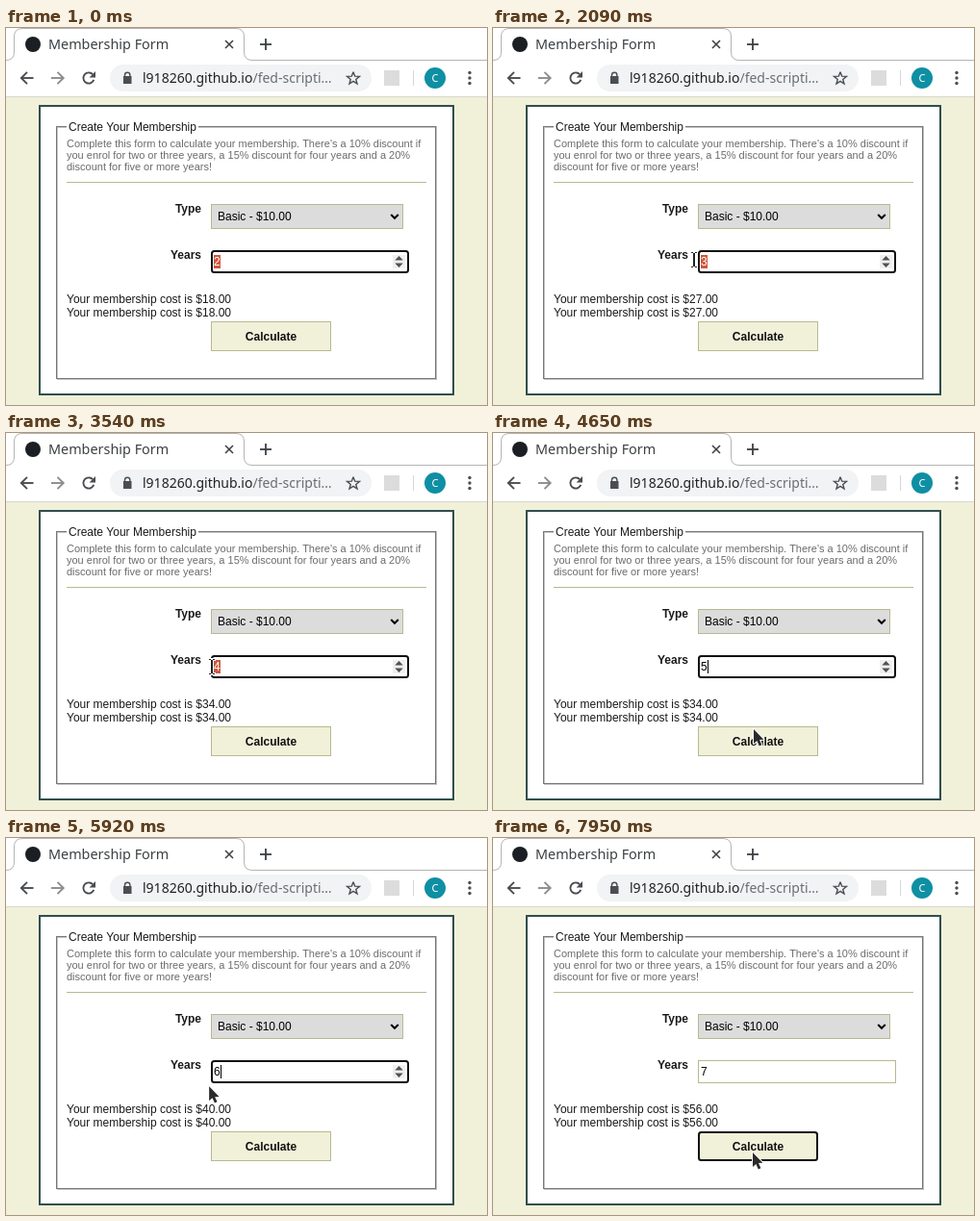
These frames come from a looping animation (500 by 392 pixels, 7990 ms). An HTML page with a canvas:

```html
<!DOCTYPE html>
<html lang="en">
<head>
<meta charset="utf-8">
<title>Membership Form</title>
<style>
  html, body { margin: 0; width: 100%; height: 100%; overflow: hidden; background: #fff; }
  canvas { display: block; width: 500px; height: 392px; }
</style>
</head>
<body>
<canvas id="stage"></canvas>
<script>
const W = 500, H = 392, LOOP = 7990;
const canvas = document.getElementById('stage');
const ratio = window.devicePixelRatio || 1;
canvas.width = W * ratio;
canvas.height = H * ratio;
const ctx = canvas.getContext('2d');

const SANS = '"Liberation Sans", Arial, sans-serif';
const UI = '"Noto Sans", "Open Sans", sans-serif';
const CREAM = '#f1f0d9', KHAKI = '#b9b890', INK = '#1a1a1a', SLATE = '#2f4f4f';

// Each round: press in the field, type a number, click the button.
const rounds = [
  { press: -1000, type: 590, click: 1250, years: 3, cost: 27 },
  { press: 1800, type: 2210, click: 2850, years: 4, cost: 34 },
  { press: 3300, type: 4200, click: 5070, years: 5, cost: 40 },
  { press: 5430, type: 5880, click: 6450, years: 6, cost: 48 },
  { press: 6950, type: 7510, click: 7900, years: 7, cost: 56 }
];

// Pointer path: time, x, y
const path = [
  [0, 217, 243], [600, 217, 243], [1150, 272, 324], [1400, 272, 324],
  [1720, 226, 243], [1800, 226, 243], [2090, 209, 241], [2200, 209, 241],
  [2750, 272, 320], [3020, 272, 320], [3270, 226, 244], [3320, 226, 244],
  [3540, 214, 243], [4200, 214, 243], [4650, 271, 308], [4950, 273, 314],
  [5080, 273, 314], [5390, 228, 244], [5450, 228, 244], [5780, 202, 243],
  [5850, 202, 243], [5920, 211, 258], [6330, 271, 316], [6640, 271, 316],
  [6790, 243, 255], [6900, 226, 244], [6960, 226, 244], [7230, 187, 243],
  [7450, 209, 243], [7500, 209, 243], [7850, 270, 327], [7990, 270, 327]
];

function slope(i, axis) {
  const a = path[i], b = path[i + 1];
  return a && b ? (b[axis] - a[axis]) / (b[0] - a[0]) : 0;
}

// Smooth tangent without overshoot
function tangent(i, axis) {
  const p = slope(i - 1, axis), q = slope(i, axis);
  return p * q > 0 ? 2 * p * q / (p + q) : 0;
}

function pointerAt(t) {
  let i = 0;
  while (i < path.length - 2 && path[i + 1][0] <= t) i++;
  const a = path[i], b = path[i + 1], span = b[0] - a[0], u = (t - a[0]) / span;
  const at = axis => {
    const v = 1 - u;
    return a[axis] * (1 + 2 * u) * v * v + b[axis] * u * u * (3 - 2 * u)
      + span * (tangent(i, axis) * u * v * v - tangent(i + 1, axis) * u * u * v);
  };
  return { x: at(1), y: at(2) };
}

function rect(x, y, w, h, color) {
  ctx.fillStyle = color;
  ctx.fillRect(x, y, w, h);
}

function frame(x, y, w, h, color, line = 1) {
  ctx.strokeStyle = color;
  ctx.lineWidth = line;
  ctx.strokeRect(x + line / 2, y + line / 2, w - line, h - line);
}

function ring(x, y, w, h) {
  ctx.beginPath();
  ctx.roundRect(x + 1, y + 1, w - 2, h - 2, 2.5);
  ctx.strokeStyle = '#101010';
  ctx.lineWidth = 2;
  ctx.stroke();
}

function text(str, x, y, font, color = INK, align = 'left') {
  ctx.font = font;
  ctx.textAlign = align;
  ctx.fillStyle = color;
  ctx.fillText(str, x, y);
}

function stroke(points, color, line) {
  ctx.beginPath();
  points.forEach(([x, y]) => ctx.lineTo(x, y));
  ctx.strokeStyle = color;
  ctx.lineWidth = line;
  ctx.stroke();
}

function shape(points, color) {
  ctx.beginPath();
  points.forEach(([x, y]) => ctx.lineTo(x, y));
  ctx.closePath();
  ctx.fillStyle = color;
  ctx.fill();
}

function disc(x, y, r, color) {
  ctx.beginPath();
  ctx.arc(x, y, r, 0, Math.PI * 2);
  ctx.fillStyle = color;
  ctx.fill();
}

function drawTabs() {
  rect(0, 0, W, 72, '#fff');
  ctx.beginPath();
  ctx.moveTo(0, 33.5);
  ctx.quadraticCurveTo(8.5, 33.5, 8.5, 25);
  ctx.lineTo(8.5, 9);
  ctx.quadraticCurveTo(8.5, 0.5, 17, 0.5);
  ctx.lineTo(239, 0.5);
  ctx.quadraticCurveTo(247.5, 0.5, 247.5, 9);
  ctx.lineTo(247.5, 25);
  ctx.quadraticCurveTo(247.5, 33.5, 256, 33.5);
  ctx.lineTo(W, 33.5);
  ctx.strokeStyle = '#b4b4b4';
  ctx.lineWidth = 1;
  ctx.stroke();

  disc(28, 17, 8, '#1b1f23');
  text('Membership Form', 44, 22, '14.4px ' + UI, '#3c4043');
  stroke([[228, 13], [236, 21]], '#3c4043', 1.6);
  stroke([[236, 13], [228, 21]], '#3c4043', 1.6);
  stroke([[264, 17], [276, 17]], '#3c4043', 1.8);
  stroke([[270, 11], [270, 23]], '#3c4043', 1.8);
}

function drawToolbar() {
  const dark = '#4a4d51';
  stroke([[28.5, 52], [16, 52]], dark, 1.9);
  stroke([[22, 45.8], [15.8, 52], [22, 58.2]], dark, 1.9);
  stroke([[47, 52], [59.5, 52]], '#8b8d90', 1.9);
  stroke([[53.5, 45.8], [59.7, 52], [53.5, 58.2]], '#8b8d90', 1.9);

  ctx.beginPath();
  ctx.arc(86, 52, 5.6, 0.35, Math.PI * 1.76);
  ctx.strokeStyle = dark;
  ctx.lineWidth = 1.9;
  ctx.stroke();
  shape([[93, 45], [93, 51.4], [86.6, 51.4]], dark);

  ctx.beginPath();
  ctx.roundRect(108, 38, 272, 28, 14);
  ctx.fillStyle = '#f1f3f4';
  ctx.fill();

  rect(122, 50, 8.5, 8, dark);
  ctx.beginPath();
  ctx.arc(126.2, 49, 2.7, Math.PI, 0);
  ctx.lineTo(128.9, 51);
  ctx.moveTo(123.5, 51);
  ctx.lineTo(123.5, 49);
  ctx.lineWidth = 1.4;
  ctx.stroke();

  const font = '14px ' + UI, host = 'l918260.github.io';
  text(host, 142, 57, font, '#202124');
  text('/fed-scripti…', 142 + ctx.measureText(host).width, 57, font, '#6a6e73');

  const star = [];
  for (let i = 0; i < 11; i++) {
    const a = -Math.PI / 2 + i * Math.PI / 5, r = i % 2 ? 2.9 : 6.8;
    star.push([361 + r * Math.cos(a), 52.5 + r * Math.sin(a)]);
  }
  stroke(star, dark, 1.4);

  rect(393, 44, 16, 16, '#dcdcdc');
  rect(423, 44, 1, 16, '#d5d7da');
  disc(446, 52, 11, '#0f8fa3');
  text('C', 446, 56, '11px ' + UI, '#fff', 'center');
  [46.5, 52, 57.5].forEach(y => disc(482, y, 1.7, dark));
  rect(0, 71, W, 1, '#d6d6d0');
}

function drawPage() {
  rect(0, 72, W, H - 72, CREAM);
  rect(34, 80, 432, 302, '#fff');
  frame(34, 80, 432, 302, SLATE, 2);

  frame(53, 103, 395, 263, '#c6c6c6');
  frame(52, 102, 395, 263, '#777');
  rect(447, 102, 1, 264, '#bbb');
  rect(446, 103, 1, 262, '#777');
  rect(63, 100, 137, 6, '#fff');
  text('Create Your Membership', 65, 107, '12px ' + SANS);

  [
    "Complete this form to calculate your membership. There's a 10% discount if",
    'you enrol for two or three years, a 15% discount for four years and a 20%',
    'discount for five or more years!'
  ].forEach((line, i) => text(line, 63, 124 + 12 * i, '11px ' + SANS, '#6b6b6b'));
  rect(63, 160, 374, 1, KHAKI);

  const bold = 'bold 12px ' + SANS;
  text('Type', 203, 192, bold, INK, 'right');
  text('Years', 203, 240, bold, INK, 'right');

  rect(213, 183, 200, 26, '#dcdcdc');
  frame(213, 183, 200, 26, KHAKI);
  text('Basic - $10.00', 220, 200, '12px ' + SANS, '#000');
  stroke([[400.2, 194], [404, 197.8], [407.8, 194]], '#000', 2);
}

function drawSpinner() {
  rect(402, 236, 13, 14, '#efefef');
  shape([[404.3, 241.5], [408.5, 237], [412.7, 241.5]], '#505050');
  shape([[404.3, 244.5], [408.5, 249], [412.7, 244.5]], '#505050');
}

function drawField(t, round, pointer) {
  const focused = t < round.click, typed = t >= round.type;
  const selected = !typed && pointer.x < 220;
  const hover = pointer.x > 213 && pointer.x < 419 && pointer.y > 231 && pointer.y < 255;

  rect(213, 231, 206, 24, '#fff');
  if (focused) ring(213, 231, 206, 24);
  else frame(213, 231, 206, 24, KHAKI);
  if (focused || hover) drawSpinner();

  if (selected) rect(216, 236, 7, 14, '#d1573e');
  text(typed ? round.years : round.years - 1, 216, 247, '12px ' + SANS, selected ? '#fff' : '#000');

  const since = t - (typed ? round.type : round.press);
  if (focused && !selected && since % 1000 < 500) rect(223, 236, 1, 14, '#000');
}

function drawResult(cost, focused) {
  const line = `Your membership cost is $${cost}.00`;
  text(line, 63, 286, '12px ' + SANS);
  text(line, 63, 300, '12px ' + SANS);

  rect(213, 305, 125, 31, CREAM);
  if (focused) ring(213, 305, 125, 31);
  else frame(213, 305, 125, 31, KHAKI);
  text('Calculate', 275.5, 325, 'bold 12px ' + SANS, '#111', 'center');
}

function drawArrow(x, y) {
  ctx.beginPath();
  [[0, 0], [0, 15], [3.4, 12], [5.8, 17.4], [8.4, 16.2], [6, 11], [10.4, 10.8]]
    .forEach(([dx, dy]) => ctx.lineTo(x + dx, y + dy));
  ctx.closePath();
  ctx.lineJoin = 'round';
  ctx.strokeStyle = '#fff';
  ctx.lineWidth = 2;
  ctx.stroke();
  ctx.lineJoin = 'miter';
  ctx.fillStyle = '#2b2b2b';
  ctx.fill();
}

function drawBeam(x, y) {
  const cx = Math.round(x), cy = Math.round(y);
  const bars = [[-3, -8, 2, 1], [1, -8, 2, 1], [-1, -7, 2, 14], [-3, 7, 2, 1], [1, 7, 2, 1]];
  bars.forEach(([dx, dy, w, h]) => rect(cx + dx - 1, cy + dy - 1, w + 2, h + 2, '#fff'));
  bars.forEach(([dx, dy, w, h]) => rect(cx + dx, cy + dy, w, h, '#222'));
}

function drawPointer(t, round, { x, y }) {
  if (t < 590) return;
  const dragging = t >= round.press && t < round.type;
  const inField = x >= 213 && x <= 419 && y >= 231 && y <= 255.5;
  if (dragging || inField) drawBeam(x, y);
  else drawArrow(x, y);
}

function draw(t) {
  const index = rounds.findLastIndex(r => r.press <= t);
  const round = rounds[index], clicked = t >= round.click;
  const before = index ? rounds[index - 1].cost : 18;
  const pointer = pointerAt(t);

  ctx.setTransform(ratio, 0, 0, ratio, 0, 0);
  drawTabs();
  drawToolbar();
  drawPage();
  drawField(t, round, pointer);
  drawResult(clicked ? round.cost : before, clicked);
  drawPointer(t, round, pointer);
}

const start = performance.now();
function tick() {
  draw((performance.now() - start) % LOOP);
  requestAnimationFrame(tick);
}
tick();
</script>
</body>
</html>
```
